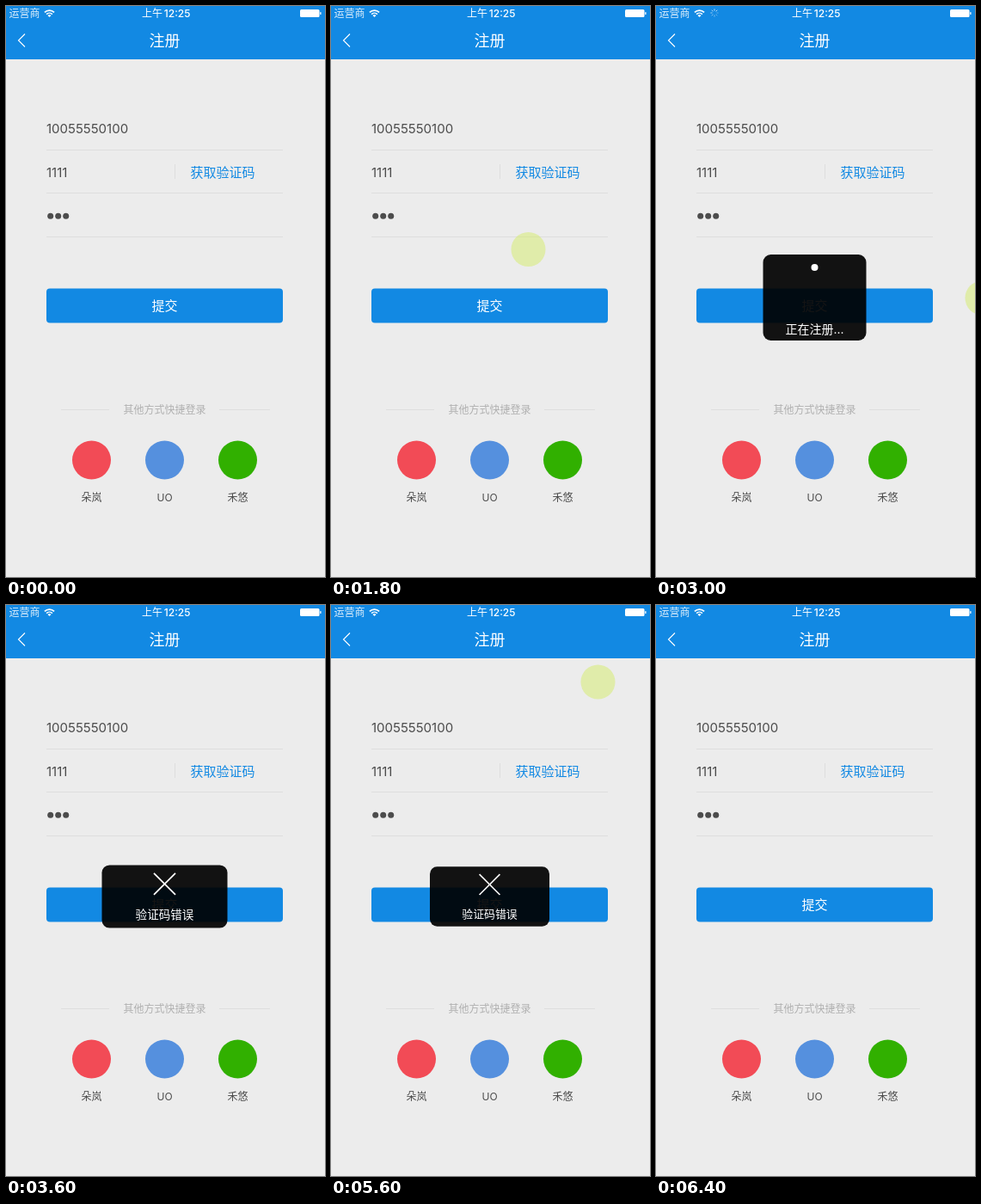
These frames come from a looping animation (371 px wide and 664 px high, 6.8 s). An HTML page with a canvas:

```html
<!DOCTYPE html>
<html lang="zh-CN">
<head>
<meta charset="utf-8">
<title>注册</title>
<style>
html, body { margin: 0; width: 100%; height: 100%; overflow: hidden; background: #ececec; }
canvas { display: block; width: 371px; height: 664px; }
</style>
</head>
<body>
<canvas id="stage"></canvas>
<script>
const W = 371, H = 664, LOOP = 6800, STEP = 200;
const MID = 184.5, HUD_Y = 339;
const BLUE = '#1289e3', BG = '#ececec', INK = '#4c4c4c', RULE = '#dedede';
const FONT = 'Inter, "Noto Sans CJK SC", "Noto Sans CJK", sans-serif';

const canvas = document.getElementById('stage');
const ctx = canvas.getContext('2d');
const ratio = window.devicePixelRatio || 1;
canvas.width = Math.round(W * ratio);
canvas.height = Math.round(H * ratio);

// Each step holds until the next: [time, x, y], or [time] for no touch.
const touchSteps = [
  [0], [400, 274, 236], [600, 287, 275], [800, 286.5, 263.5],
  [1000, 243, 280], [1800, 229.5, 283], [2000, 260, 518],
  [2200, 207, 323], [2400, 198, 339], [3000, 379.5, 339.5], [3200],
  [4800, 361.5, 373.5], [5000, 367, 351], [5200, 357, 249],
  [5400, 310.5, 89.5], [5800, 298, 26], [6000]
];

// The error panel springs in and draws back before it shrinks: [time, scale].
const errorSteps = [
  [0, 0], [3200, 0.5], [3400, 0.993], [3600, 1.043], [3800, 1.005], [4000, 1],
  [5600, 0.993], [5800, 1.057], [6000, 0.86], [6200, 0.18], [6400, 0]
];

function stepAt(steps, t) {
  return steps.filter(s => s[0] <= t).pop();
}

function text(str, x, y, size, color, align = 'center', weight = 400) {
  ctx.font = `${weight} ${size}px ${FONT}`;
  ctx.textAlign = align;
  ctx.fillStyle = color;
  ctx.fillText(str, x, y + size * 0.37);
}

function disc(x, y, r, color) {
  ctx.fillStyle = color;
  ctx.beginPath();
  ctx.arc(x, y, r, 0, Math.PI * 2);
  ctx.fill();
}

function panel(x, y, w, h, r, color) {
  ctx.fillStyle = color;
  ctx.beginPath();
  ctx.roundRect(x, y, w, h, r);
  ctx.fill();
}

function path(points, color, width = 1) {
  ctx.strokeStyle = color;
  ctx.lineWidth = width;
  ctx.beginPath();
  points.forEach(([x, y], i) => i ? ctx.lineTo(x, y) : ctx.moveTo(x, y));
  ctx.stroke();
}

function wifi(x, y) {
  const a = Math.PI * 0.25;
  ctx.strokeStyle = '#fff';
  ctx.lineWidth = 1.6;
  for (const r of [4.8, 7.9]) {
    ctx.beginPath();
    ctx.arc(x, y, r, -Math.PI / 2 - a, -Math.PI / 2 + a);
    ctx.stroke();
  }
  ctx.fillStyle = '#fff';
  ctx.beginPath();
  ctx.moveTo(x, y);
  ctx.arc(x, y, 2.8, -Math.PI / 2 - a, -Math.PI / 2 + a);
  ctx.fill();
}

function spinner(x, y) {
  for (let i = 0; i < 8; i++) {
    const a = i * Math.PI / 4, c = Math.cos(a), s = Math.sin(a);
    path([[x + c * 2.4, y + s * 2.4], [x + c * 4.6, y + s * 4.6]],
      `rgba(255,255,255,${0.3 + i * 0.07})`);
  }
}

function header(busy) {
  ctx.fillStyle = BLUE;
  ctx.fillRect(0, 0, W, 62);
  text('运营商', 3.5, 8.5, 12, 'rgba(255,255,255,0.85)', 'left');
  wifi(50.5, 13);
  if (busy) spinner(68, 8);
  text('上午', 158, 8.5, 12, '#fff', 'left', 500);
  text('12:25', 214.5, 8.5, 12, '#fff', 'right', 500);
  panel(342, 4, 22.5, 9, 1.5, '#fff');
  panel(365.2, 7, 1.3, 3, 0.6, '#fff');
  path([[22, 32.5], [14.5, 40], [22, 47.5]], '#fff', 1.1);
  text('注册', MID, 40, 18, '#fff', 'center', 500);
}

function form() {
  text('10055550100', 47, 142.5, 15, INK, 'left');
  text('1111', 47, 193, 15, INK, 'left');
  for (let i = 0; i < 3; i++) disc(51.7 + i * 9, 244.3, 3.5, INK);
  for (const y of [167.5, 217.5, 268.5]) path([[47, y], [322, y]], RULE);
  path([[196.5, 184], [196.5, 201]], RULE);
  text('获取验证码', 214.5, 193, 15, BLUE, 'left');
  panel(47, 328.5, 275, 40, 4, BLUE);
  text('提交', MID, 348.7, 15, '#fff');
}

function social() {
  path([[64, 469.5], [120, 469.5]], RULE);
  path([[248, 469.5], [307, 469.5]], RULE);
  text('其他方式快捷登录', MID, 469.7, 12, '#b0b0b0');
  [['朵岚', '#f24b56'], ['UO', '#5590de'], ['禾悠', '#31b000']].forEach(([name, color], i) => {
    const x = 99.5 + i * 85;
    disc(x, 528, 22.5, color);
    text(name, x, 572, 12, INK);
  });
}

function progressHud() {
  panel(MID - 60, HUD_Y - 50, 120, 100, 9, 'rgba(0,0,0,0.92)');
  disc(MID, 304, 4, '#fff');
  text('正在注册...', MID, 376, 14, '#fff');
}

function errorHud(scale) {
  ctx.save();
  ctx.translate(MID, HUD_Y);
  ctx.scale(scale, scale);
  panel(-70, -35, 140, 70, 8.5, 'rgba(0,0,0,0.92)');
  path([[-12, -26], [12, -2]], '#fff', 1.6);
  path([[12, -26], [-12, -2]], '#fff', 1.6);
  text('验证码错误', 0, 20, 13, '#fff');
  ctx.restore();
}

function draw(t) {
  const busy = t >= 3000 && t < 3200;
  const scale = stepAt(errorSteps, t)[1];
  const [, x, y] = stepAt(touchSteps, t);
  ctx.setTransform(ratio, 0, 0, ratio, 0, 0);
  ctx.fillStyle = BG;
  ctx.fillRect(0, 0, W, H);
  header(busy);
  form();
  social();
  if (busy) progressHud();
  if (scale) errorHud(scale);
  if (x !== undefined) disc(x, y, 20, 'rgba(209,236,89,0.45)');
}

const start = performance.now();
function frame() {
  const t = (performance.now() - start) % LOOP;
  draw(Math.floor(t / STEP) * STEP);
  requestAnimationFrame(frame);
}
frame();
</script>
</body>
</html>
```
